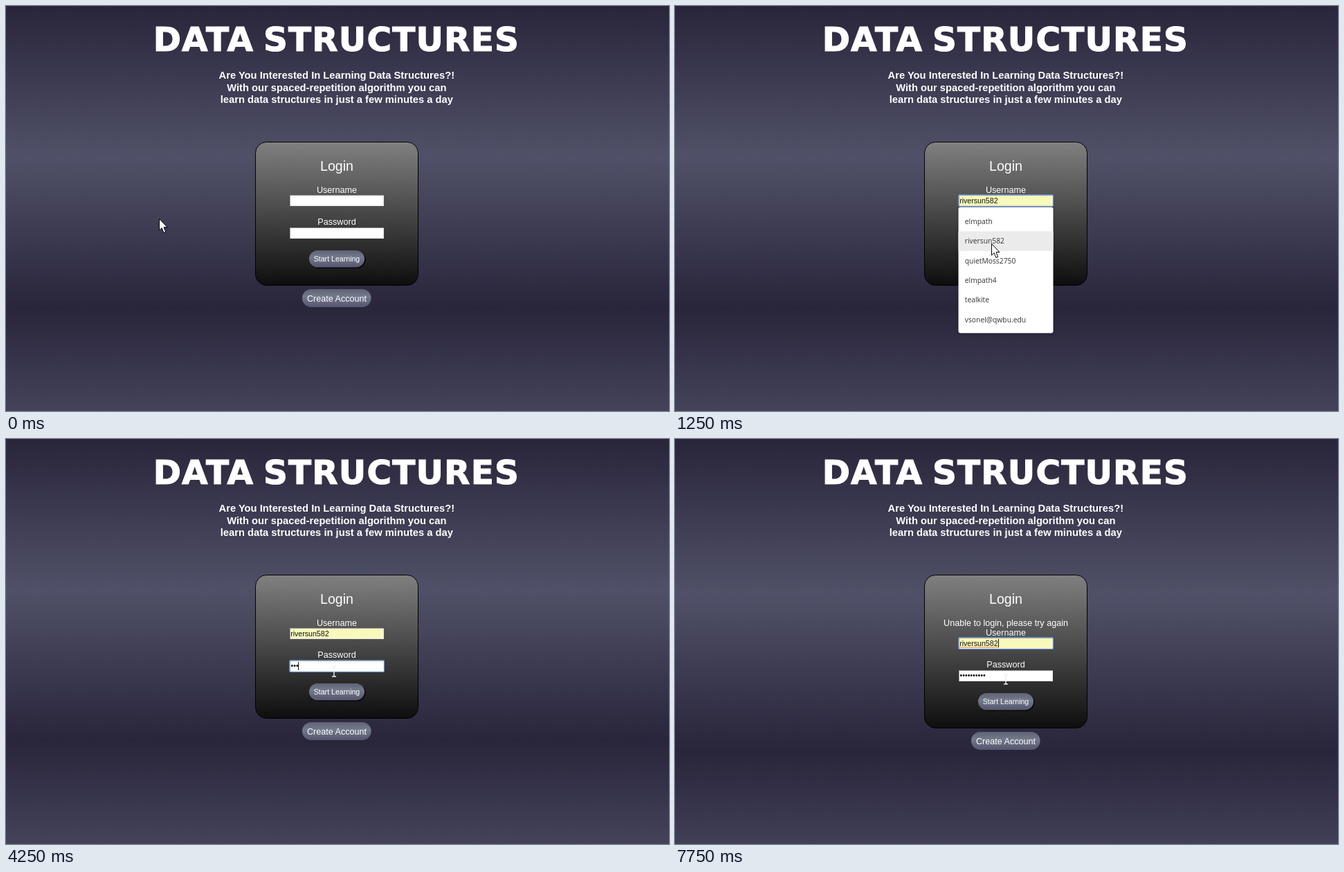
An HTML page for the animation above (8000 ms loop, 958 by 585 pixels).

```html
<!DOCTYPE html>
<html lang="en">
<head>
<meta charset="utf-8">
<title>Data structures login</title>
<style>
  html, body { margin: 0; width: 100%; height: 100%; overflow: hidden; background: #29253b; }
  svg { display: block; width: 958px; height: 585px; }
  text { font-family: "Liberation Sans", Arial, sans-serif; font-size: 12.6px; fill: #fff; white-space: pre; }
  .mid { text-anchor: middle; }
  .title { font-family: "DejaVu Sans", sans-serif; font-weight: 700; font-size: 48.5px; letter-spacing: 1.2px; stroke: #fff; stroke-width: 1.2px; }
  .lead { font-weight: 700; font-size: 14.72px; }
  .login { font-size: 19.6px; }
  .small { font-size: 10.6px; }
  .value { font-size: 10.6px; fill: #111; }
  .option { font-family: "Open Sans", "Noto Sans", sans-serif; font-size: 10.3px; fill: #333; }
  #menu { filter: drop-shadow(0 1px 2px rgba(0, 0, 0, .35)); }
</style>
</head>
<body>
<svg viewBox="0 0 958 585">
  <defs>
    <linearGradient id="sky" gradientUnits="userSpaceOnUse" x1="0" y1="0" x2="0" y2="436" spreadMethod="repeat">
      <stop offset="0" stop-color="#29253b"/>
      <stop offset=".5" stop-color="#505168"/>
      <stop offset="1" stop-color="#29253b"/>
    </linearGradient>
    <linearGradient id="panel" x2="0" y2="1">
      <stop offset="0" stop-color="#808080"/>
      <stop offset="1" stop-color="#0e0e0e"/>
    </linearGradient>
    <linearGradient id="pill" x2="0" y2="1">
      <stop offset="0" stop-color="#606176"/>
      <stop offset=".4" stop-color="#737a8b"/>
      <stop offset="1" stop-color="#56556e"/>
    </linearGradient>
    <g id="field">
      <rect width="136" height="16" fill="#a0a0a0"/>
      <rect x="1" y="1" width="135" height="15" fill="#e6e6e6"/>
    </g>
  </defs>

  <rect width="958" height="585" fill="url(#sky)"/>
  <text class="mid title" x="285.5" y="65">DATA</text>
  <text class="mid title" x="557" y="65">STRUCTURES</text>
  <text class="mid lead" x="477.8" y="105">Are You Interested In Learning Data Structures?!</text>
  <text class="mid lead" x="477.8" y="122.6">With our spaced-repetition algorithm you can</text>
  <text class="mid lead" x="477.8" y="140">learn data structures in just a few minutes a day</text>

  <rect id="card" x="360.5" y="196.5" width="235" height="207" rx="16" fill="url(#panel)" stroke="#000"/>
  <text class="mid login" x="478" y="238">Login</text>
  <text class="mid" id="error" x="478" y="269.6">Unable to login, please try again</text>

  <g id="form">
    <text class="mid" x="478" y="269.6">Username</text>
    <use href="#field" x="410" y="273"/>
    <rect id="userFill" x="411" y="274" width="134" height="14"/>
    <text class="value" id="user" x="411.2" y="285"></text>
    <path id="squiggle" fill="none" stroke="#e0604c" stroke-width=".9"/>

    <text class="mid" x="478" y="316">Password</text>
    <use href="#field" x="410" y="320"/>
    <rect x="411" y="321" width="134" height="14" fill="#fff"/>
    <text class="value" id="dots" x="411.5" y="331.4"></text>

    <rect id="ring" x="409.5" width="137" height="17" rx="1" fill="none" stroke="#5f90d8"/>
    <rect id="caret" width="1" height="12" fill="#111"/>

    <rect x="438.5" y="354" width="81" height="25" rx="12.5" fill="#06060a"/>
    <rect x="438" y="353" width="80" height="24.6" rx="12.3" fill="url(#pill)"/>
    <text class="mid small" x="478" y="369">Start Learning</text>
    <rect x="428" y="409" width="99.6" height="26" rx="13" fill="url(#pill)"/>
    <text class="mid" x="478" y="426.5">Create Account</text>
  </g>

  <g id="menu">
    <rect x="409.5" y="290.5" width="137" height="182" rx="3" fill="#fff"/>
    <rect id="hover" x="409.5" width="137" height="28.4" fill="#ebebeb"/>
  </g>

  <path id="arrow" fill="#fff" stroke="#000" stroke-linejoin="round"
        d="M.5 .5V17L4.2 13.6 6.9 20.5 9.7 19.3 7 12.6H12Z"/>
  <path id="beam" fill="none" stroke="#f0f0f0" stroke-width="1.4"
        d="M-3 -7H-1Q0 -7 0 -6V6Q0 7 -1 7H-3M3 -7H1Q0 -7 0 -6M0 6Q0 7 1 7H3"/>
</svg>

<script>
const LOOP = 8000;
const ROW = 28.4;
const BULLET = 3.73;
const LOGIN = "riversun582";
const options = ["elmpath", LOGIN, "quietMoss2750", "elmpath4", "tealkite", "vsonel@qwbu.edu"];

const el = {};
document.querySelectorAll("svg [id]").forEach(node => el[node.id] = node);

options.forEach((name, i) => {
  const text = document.createElementNS("http://www.w3.org/2000/svg", "text");
  text.setAttribute("class", "option");
  text.setAttribute("x", 418.8);
  text.setAttribute("y", 314.8 + i * ROW);
  text.textContent = name;
  el.menu.append(text);
});

let wave = "M411 287.5";
for (let x = 412.5, i = 0; x < 467; x += 1.5, i++) wave += `L${x} ${i % 2 ? 287.5 : 286.3}`;
el.squiggle.setAttribute("d", wave);

const arrow = (x, y) => ({ kind: "arrow", x, y });
const beam = (x, y) => ({ kind: "beam", x, y });

// Each step changes only what it names; the rest carries over.
const steps = [
  [0, { pointer: arrow(221, 307), user: "", dots: 0, focus: "", caret: false, menu: false, hover: -1, error: false }],
  [250, { pointer: arrow(421, 290) }],
  [500, { pointer: beam(455, 291) }],
  [750, { focus: "user", caret: true, menu: true }],
  [1000, { pointer: arrow(460, 331), user: LOGIN, caret: false, hover: 1 }],
  [1250, { pointer: arrow(457, 343) }],
  [1500, { pointer: beam(458, 342), caret: true, menu: false }],
  [1750, { pointer: beam(465, 332) }],
  [2000, { pointer: beam(476, 332), focus: "pass" }],
  [2500, { caret: false }],
  [3000, { caret: true, pointer: beam(465, 339) }],
  [3250, { pointer: beam(474, 336) }],
  [3500, { caret: false }],
  [4000, { caret: true, dots: 1 }],
  [4250, { dots: 3 }],
  [4750, { dots: 5 }],
  [5250, { dots: 8 }],
  [5750, { dots: 10 }],
  [6250, { caret: false }],
  [6750, { error: true, focus: "user", caret: true, pointer: arrow(474, 338) }],
  [7250, { caret: false, pointer: arrow(474, 344) }],
  [7500, { pointer: beam(478, 347) }],
  [7750, { caret: true }]
];

const stateAt = t => Object.assign({}, ...steps.filter(([at]) => at <= t).map(([, change]) => change));
const set = (node, attrs) => Object.entries(attrs).forEach(([key, value]) => node.setAttribute(key, value));
const show = (node, on) => node.setAttribute("visibility", on ? "visible" : "hidden");

function draw(t) {
  const s = stateAt(t);
  const shift = s.error ? 14 : 0;
  const onUser = s.focus === "user";
  const fieldTop = onUser ? 273 : 320;

  set(el.sky, { y2: 436 + shift });
  set(el.card, { height: 207 + shift });
  set(el.form, { transform: `translate(0 ${shift})` });
  show(el.error, s.error);

  el.user.textContent = s.user;
  el.dots.textContent = "•".repeat(s.dots);
  set(el.userFill, { fill: s.user ? "#f8fabb" : "#fff" });
  show(el.squiggle, onUser && s.user && !s.menu);

  show(el.ring, s.focus);
  set(el.ring, { y: fieldTop - 0.5 });
  show(el.caret, s.caret);
  const typed = onUser ? (s.user ? 55.5 : 0) : s.dots * BULLET;
  set(el.caret, { x: Math.round(411.3 + typed), y: fieldTop + 2 });

  el.menu.style.display = s.menu ? "" : "none";
  show(el.hover, s.hover >= 0);
  set(el.hover, { y: 297 + Math.max(s.hover, 0) * ROW });

  for (const kind of ["arrow", "beam"]) show(el[kind], s.pointer.kind === kind);
  set(el[s.pointer.kind], { transform: `translate(${s.pointer.x} ${s.pointer.y})` });
}

const start = performance.now();
function tick() {
  draw((performance.now() - start) % LOOP);
  requestAnimationFrame(tick);
}
tick();
</script>
</body>
</html>
```
